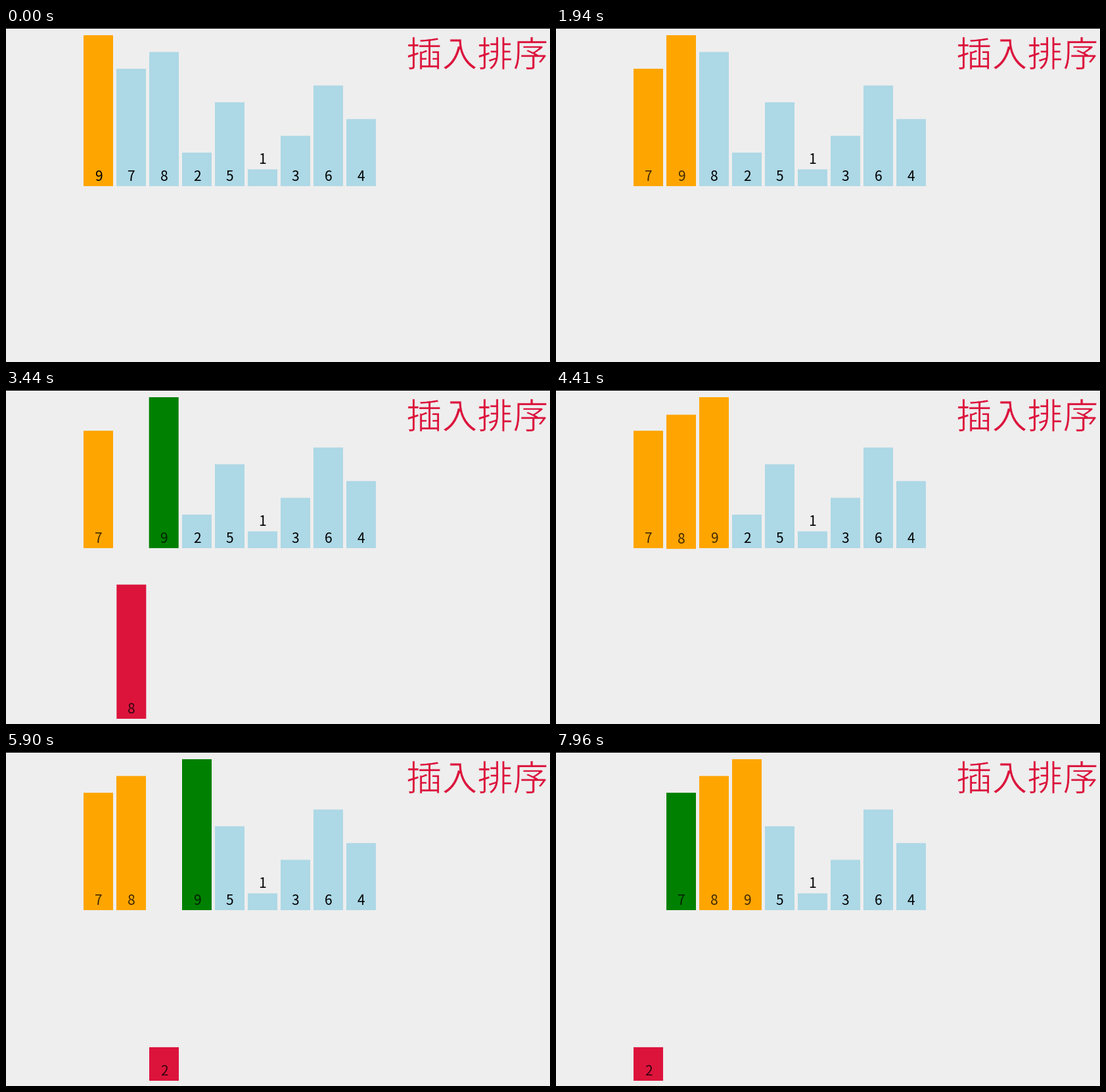
These frames come from a looping animation (828 by 509 pixels, 8 s). A matplotlib script:

```python
import numpy as np
import matplotlib.pyplot as plt
from matplotlib.animation import FuncAnimation
from matplotlib.colors import to_rgb
from matplotlib.patches import Rectangle
from matplotlib.patheffects import Stroke

W, H, DPI = 828, 509, 64
LOOP, STEP = 8000, 20
FONT, PAPER = "Noto Sans CJK JP", "#eeeeee"

VALUES = [9, 7, 8, 2, 5, 1, 3, 6, 4]
LEFT, PITCH, BAR_W = 118, 50, 45
BASE, UNIT, DROP = 241, 230 / 9, 260

# Sorting steps start at a steady beat; the picture refreshes at its own rate
FIRST, BEAT, TWEEN = 276, 487.7, 160
PHASE, REFRESH = 270, 139.7

IDLE, SORTED, COMPARE, PICKED = map(
    to_rgb, ("lightblue", "orange", "green", "crimson"))


def insertion_steps(values):
    """List of steps; each maps a value to its new slot, drop or colour."""
    a, steps = list(values), []
    for i in range(1, len(a)):
        key, j, last = a[i], i, None
        steps.append({key: dict(drop=DROP, color=PICKED)})
        while j > 0:
            other = a[j - 1]
            step = {other: dict(color=COMPARE)}
            if last is not None:
                step[last] = dict(color=SORTED)
            steps.append(step)
            last = other
            if other < key:
                break
            steps.append({other: dict(slot=j), key: dict(slot=j - 1)})
            a[j - 1], a[j] = key, other
            j -= 1
        steps.append({key: dict(drop=0, color=SORTED),
                      last: dict(color=SORTED)})
    return steps


STEPS = insertion_steps(VALUES)


def ease(u):
    u = min(max(u, 0), 1)
    return 4 * u ** 3 if u < 0.5 else 1 - 4 * (1 - u) ** 3


def pose_at(t):
    pose = {v: dict(slot=i, drop=0, color=IDLE if i else SORTED, ink=1)
            for i, v in enumerate(VALUES)}
    for n, step in enumerate(STEPS):
        start = FIRST + n * BEAT
        if t <= start:
            break
        k = ease((t - start) / TWEEN)
        for v, goal in step.items():
            for name, end in goal.items():
                old = np.asarray(pose[v][name], float)
                pose[v][name] = old + (np.asarray(end) - old) * k
            if k == 1:
                pose[v]["ink"] = 0.75
    return pose


def pt(px):
    return px * 72 / DPI


fig = plt.figure(figsize=(W / DPI, H / DPI), dpi=DPI, facecolor=PAPER)
ax = fig.add_axes([0, 0, 1, 1])
ax.set(xlim=(0, W), ylim=(H, 0))
ax.axis("off")
ax.add_patch(Rectangle((0, 0), W, 1, fc="black", lw=0))

# A paper-coloured outline thins the strokes of the title
ax.text(609.5, 59, "插入排序", color="crimson", family=FONT, size=pt(54),
        va="baseline",
        path_effects=[Stroke(linewidth=pt(0.9), foreground=PAPER)])

bars, labels = {}, {}
for v in VALUES:
    bars[v] = ax.add_patch(
        Rectangle((0, 0), BAR_W, v * UNIT, lw=0, snap=False))
    labels[v] = ax.text(0, 0, str(v), family=FONT, size=pt(21),
                        ha="center", va="baseline")


def draw(i):
    now = i * STEP + STEP / 2
    t = PHASE + REFRESH * np.floor((now - PHASE) / REFRESH)
    for v, p in pose_at(t).items():
        x = LEFT + PITCH * float(p["slot"])
        foot = BASE + float(p["drop"])
        height = v * UNIT
        lift = 8 if height > 30 else height + 8  # short bars: number on top
        bars[v].set_xy((x, foot - height))
        bars[v].set_facecolor(tuple(p["color"]))
        labels[v].set_position((x + BAR_W / 2, foot - lift))
        labels[v].set_alpha(p["ink"])
    return [*bars.values(), *labels.values()]


anim = FuncAnimation(fig, draw, frames=LOOP // STEP, interval=STEP,
                     repeat=True, repeat_delay=0, blit=False)
plt.show()
```
